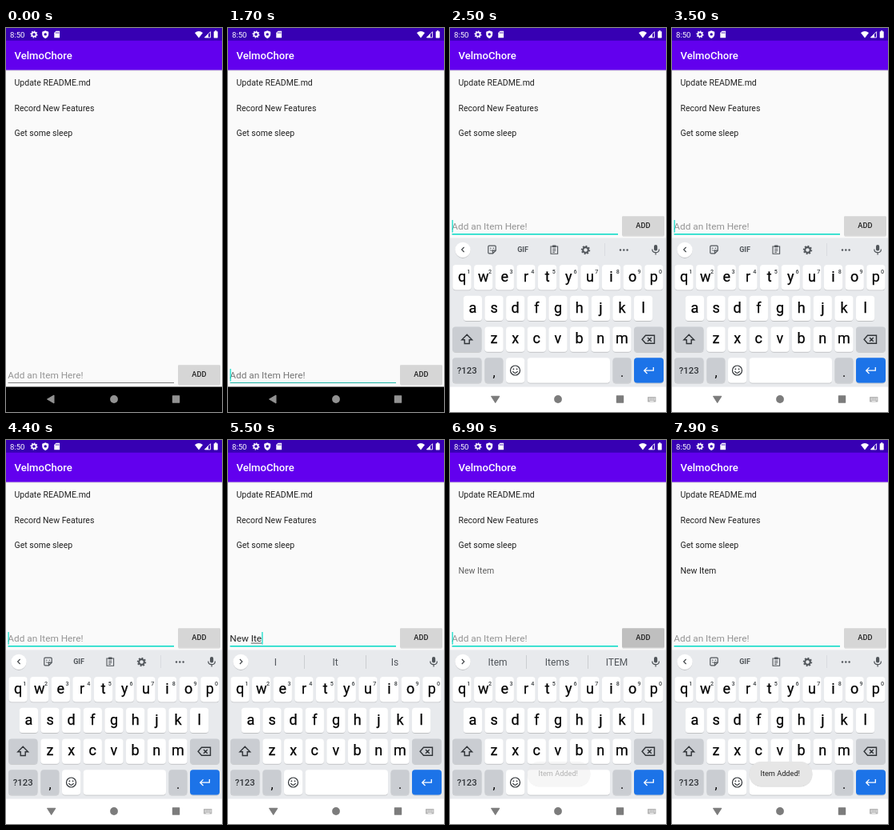
These frames come from a looping animation (270x480 px, 8000 ms). An HTML page:

```html
<!DOCTYPE html>
<html lang="en">
<head>
<meta charset="utf-8">
<style>
  html, body { margin: 0; width: 100%; height: 100%; overflow: hidden; background: #fafafa; }
  svg { display: block; width: 100%; height: 100%; font-family: Roboto, "Noto Sans", sans-serif; }
  text { white-space: pre; }
  .mid { text-anchor: middle; }
  .cap { stroke: #000; stroke-width: .25; }
</style>
</head>
<body>
<svg id="stage" viewBox="0 0 270 480" xmlns="http://www.w3.org/2000/svg"></svg>
<script>
const LOOP = 8000;
const FOCUS = 1700, KEYBOARD = 1950, PRESS = 6750, ADDED = 6880;
const LIFT = 186;
const TYPED = 'New Item';
const KEY_TIMES = [4620, 4760, 4890, 5030, 5220, 5350, 5460, 5620];
const SUGGESTIONS = [
  [4800, ['N', 'No', 'Not']],
  [5000, ['New', 'News', 'Newer']],
  [5200, ['one', 'year', 'day']],
  [5440, ['I', 'It', 'Is']],
  [5680, ['Ite', 'Item', 'Items']],
  [5850, ['Item', 'Items', 'ITEM']]
];
const SUGGEST_END = 6980;
const BLINK_RESETS = [FOCUS, 2050, ...KEY_TIMES, 6950];

// Markup helpers
const rect = (x, y, w, h, fill, more = '') =>
  `<rect x="${x}" y="${y}" width="${w}" height="${h}" fill="${fill}" ${more}/>`;
const circle = (x, y, r, fill, more = '') =>
  `<circle cx="${x}" cy="${y}" r="${r}" fill="${fill}" ${more}/>`;
const path = (d, fill, more = '') => `<path d="${d}" fill="${fill}" ${more}/>`;
const line = (d, color, width = 1.2, more = '') =>
  path(d, 'none', `stroke="${color}" stroke-width="${width}" ${more}`);
const label = (x, y, size, fill, str, more = '') =>
  `<text x="${x}" y="${y}" font-size="${size}" fill="${fill}" ${more}>${str}</text>`;
const mid = (x, y, size, fill, str, more = '') =>
  label(x, y, size, fill, str, 'text-anchor="middle" ' + more);
const group = (id, body, more = '') => `<g id="${id}" ${more}>${body}</g>`;

const gear = (x, y, r, color) =>
  circle(x, y, r * 0.58, 'none', `stroke="${color}" stroke-width="${r * 0.36}"`) +
  circle(x, y, r * 0.84, 'none',
    `stroke="${color}" stroke-width="${r * 0.3}" pathLength="16" stroke-dasharray="1"`);

function statusBar() {
  return rect(0, 0, 270, 15.75, '#3700b3') +
    label(5, 11.7, 9.6, '#fff', '8:50') +
    gear(35, 8, 4.6, '#fff') +
    path('M49.2 3.2l4 1.6v3c0 2.6-1.7 4.3-4 5.2c-2.3-.9-4-2.600-4-5.200v-3z', '#fff') +
    circle(49.2, 7.9, 1.7, '#3700b3') +
    path('M62.5 3.7h4.6v8.6h-6.8v-6.4z', '#fff') +
    line('M62.6 5v2M64.2 5v2M65.8 5v2', '#3700b3', 0.7) +
    path('M236 6.1q5-4.2 10 0l-5 6.3z', '#fff') +
    line('M255.600 4.700v7.200h-7.200z', '#fff', 0.9) +
    path('M253 7.300v4.800h-4.800z', '#fff') +
    rect(259.700, 4.200, 5, 8.200, '#fff', 'rx=".6"') + rect(261.100, 3.200, 2.200, 1.400, '#fff');
}

function appBar() {
  return rect(0, 0, 270, 52.5, '#6200ee', 'filter="url(#shade)"') +
    label(10.5, 39, 13.1, '#fff', 'VelmoChore', 'font-weight="500"');
}

function list() {
  return ['Update README.md', 'Record New Features', 'Get some sleep', 'New Item']
    .map((s, i) => label(10.5, 72.2 + i * 31.5, 10.52, '#212121', s, `id="item${i}"`)).join('');
}

function entryRow() {
  return group('entry',
    label(2.3, 438.1, 11.8, '#949494', 'Add an Item Here!', 'id="hint"') +
    label(2.3, 438.1, 11.8, '#212121', '', 'id="typed"') +
    rect(0, 439.6, 0, 0.8, '#333', 'id="compose"') +
    rect(2.5, 443, 207.5, 1, '#808080', 'id="under"') +
    rect(2.3, 426, 1.2, 15.6, '#03dac5', 'id="cursor"') +
    rect(215, 421.2, 53, 24.3, '#d6d7d7', 'id="button" rx="1.4" filter="url(#soft)"') +
    mid(241.4, 436.4, 9.2, '#212121', 'ADD', 'font-weight="500"'));
}

function tools() {
  const c = '#50555a';
  return line('M17.600 274l-3 3l3 3', '#3c4043', 1.1) +
    line('M49 272.200h7q1.200 0 1.200 1.200v4.800l-3.700 3.700h-4.500q-1.200 0-1.200-1.200v-7.300q0-1.200 1.200-1.200zM57 278.200h-3.500v3.500', c) +
    circle(50.8, 275.3, 0.7, c) + circle(54.3, 275.3, 0.7, c) +
    line('M50 277.5q2 2 3.5 0', c, 0.9) +
    mid(91, 280.3, 9, c, 'GIF', 'font-weight="700"') +
    line('M126 273h8.6v9.3h-8.6zM128.3 276.2h4M128.3 278.2h4M128.3 280.2h2.6', c, 1.1) +
    rect(128, 271.4, 4.6, 2.8, c, 'rx=".6"') +
    gear(169.5, 277.5, 5.8, c) +
    rect(193, 269, 0.8, 16, '#d6d9dc') +
    [213, 217.3, 221.6].map(x => circle(x, 277.5, 1.2, c)).join('');
}

function suggestionBar() {
  return line('M14.800 274l3 3l-3 3', '#3c4043', 1.1) +
    [59.5, 134, 208.5].map((x, i) => mid(x, 281.7, 12, '#50555a', '', `id="word${i}"`)).join('') +
    [95, 172].map(x => rect(x, 269, 0.8, 17, '#c4c7ca')).join('');
}

const key = (x, y, w, fill) => rect(x, y, w, 31.3, fill, 'rx="4" filter="url(#edge)"');

function letters(row, first, y, numbered) {
  return [...row].map((ch, i) => {
    const x = first + i * 26.65;
    return key(x - 11.6, y, 23.2, '#fff') + mid(x, y + 20.8, 18, '#000', ch, 'class="cap"') +
      (numbered ? mid(x + 8.3, y + 10.8, 7.2, '#3c4043', (i + 1) % 10, 'font-weight="500"') : '');
  }).join('');
}

function keyboard() {
  const grey = '#cacdd2', ink = '#303438';
  return group('keyboard',
    rect(0, 262.5, 270, 186, '#e8eaed') +
    circle(16, 277.3, 9.6, '#fff', 'filter="url(#edge)"') +
    group('tools', tools()) + group('suggest', suggestionBar()) +
    rect(255, 271, 4.2, 7.6, '#50555a', 'rx="2.1"') +
    line('M252.8 276.5q0 4.2 4.3 4.2t4.3-4.2M257.1 280.7v2.8', '#50555a', 1.2) +
    letters('qwertyuiop', 15, 296, true) +
    letters('asdfghjkl', 28.4, 334.7) +
    key(3, 373.5, 36.5, grey) + letters('zxcvbnm', 55, 373.5) + key(230, 373.5, 37, grey) +
    line('M21.2 383.200l-6.400 6.500h3.400v4.800h6v-4.800h3.400z', ink, 1.4) +
    line('M244.5 384.300h11v10h-11l-4.400-5zM247 386.900l4.800 4.800M251.800 386.900l-4.800 4.800', ink, 1.4) +
    key(3, 412.2, 36.5, grey) + mid(21.2, 432, 11.3, ink, '?123', 'font-weight="500"') +
    key(43.4, 412.2, 23, grey) + mid(55, 436, 16, '#000', ',') +
    key(70, 412.2, 23.2, '#fff') +
    circle(81.5, 428, 6, 'none', `stroke="${ink}" stroke-width="1.2"`) +
    circle(79.4, 426.3, 0.9, ink) + circle(83.6, 426.3, 0.9, ink) +
    line('M78.4 429.2q3.1 4.200 6.200 0', ink, 1.2) +
    key(96.7, 412.2, 103.3, '#fff') +
    key(203.5, 412.2, 23, grey) + mid(215, 436, 16, '#000', '.') +
    key(230, 412.2, 37, '#1a73e8') +
    line('M254.300 424v4.200h-11.600M246.500 424.400l-3.800 3.800l3.800 3.800', '#fff', 1.3));
}

function navIcons() {
  const c = '#b4b4b4';
  const dots = [0, 1, 2, 3].map(i => rect(248.6 + i * 2.2, 462.4, 1.1, 1.1, '#fff') +
    rect(248.6 + i * 2.2, 464.3, 1.1, 1.1, '#fff')).join('');
  return group('nav',
    '<path id="back" stroke-width="1" stroke-linejoin="round"/>' +
    '<circle cx="135" cy="464" r="4.9"/>' +
    '<rect x="207.8" y="459.300" width="9.4" height="9.4" rx=".6"/>') +
    group('imeIcon', rect(247, 461, 10.4, 6.4, c, 'rx=".6"') + dots +
      rect(249.8, 466, 4.8, 0.7, '#fff'));
}

function toast() {
  return group('toast',
    rect(96.5, 402, 79, 30.5, '#e6e6e6', 'rx="15.2" filter="url(#soft)"') +
    mid(135.2, 420.2, 9.2, '#212121', 'Item Added!'));
}

const shadow = (id, dy, blur, alpha) =>
  `<filter id="${id}" x="-10%" y="-15%" width="120%" height="140%">
    <feDropShadow dx="0" dy="${dy}" stdDeviation="${blur}" flood-opacity="${alpha}"/></filter>`;

const stage = document.getElementById('stage');
stage.innerHTML =
  `<defs>${shadow('shade', 0.8, 0.6, 0.2)}${shadow('soft', 0.7, 0.5, 0.25)}${shadow('edge', 0.8, 0.25, 0.22)}</defs>` +
  rect(0, 0, 270, 480, '#fafafa') + appBar() + statusBar() + list() + entryRow() +
  rect(0, 448.5, 270, 31.5, '#000', 'id="navBack"') + keyboard() + navIcons() + toast();

const el = {};
stage.querySelectorAll('[id]').forEach(n => el[n.id] = n);
const set = (id, attrs) => {
  for (const k in attrs) el[id].setAttribute(k, attrs[k]);
};
const show = (id, on) => set(id, { visibility: on ? 'visible' : 'hidden' });
const ramp = (t, start, length) => Math.min(1, Math.max(0, (t - start) / length));

const pen = document.createElement('canvas').getContext('2d');
const widthOf = s => {
  pen.font = '11.8px Roboto, "Noto Sans", sans-serif';
  return pen.measureText(s).width;
};

function drawEntry(t, up) {
  const focused = t >= FOCUS;
  const count = t < ADDED ? KEY_TIMES.filter(k => t >= k).length : 0;
  const text = TYPED.slice(0, count);
  const wordStart = text.lastIndexOf(' ') + 1;
  const before = widthOf(text.slice(0, wordStart)), end = widthOf(text);
  const reset = BLINK_RESETS.filter(b => t >= b).pop();

  set('entry', { transform: `translate(0 ${up ? -LIFT : 0})` });
  show('hint', !count);
  set('hint', { fill: focused && !up ? '#757575' : '#949494' });
  el.typed.textContent = text;
  set('compose', { x: 2.3 + before, width: end - before });
  set('under', {
    fill: !focused ? '#808080' : up ? '#03dac5' : '#1fb5a6',
    height: up ? 1.5 : 1
  });
  set('cursor', { x: 2.3 + end + 0.2 });
  show('cursor', focused && (t - reset) % 1000 < 500);

  const held = ramp(t, PRESS, 100) * (1 - ramp(t, 6930, 200));
  const tone = Math.round(214 - 23 * held);
  set('button', { fill: `rgb(${tone},${tone},${tone})` });
}

function drawKeyboard(t, up) {
  const p = ramp(t, KEYBOARD, 250);
  show('keyboard', up);
  set('keyboard', {
    transform: `translate(0 ${24 * (1 - p) ** 2})`,
    opacity: Math.min(1, p * 2.5)
  });
  const now = SUGGESTIONS.filter(s => t >= s[0]).pop();
  const suggesting = up && now && t < SUGGEST_END;
  show('tools', up && !suggesting);
  show('suggest', suggesting);
  if (suggesting) now[1].forEach((word, i) => el['word' + i].textContent = word);

  const navColor = up ? '#7c7c7c' : '#929292';
  set('navBack', { fill: up ? '#fff' : '#000' });
  set('nav', { fill: navColor });
  set('back', {
    d: up ? 'M51.5 460.3h10.4l-5.2 8.2z' : 'M51.5 464l8.500-5v10z',
    stroke: navColor
  });
  show('imeIcon', up);
}

function draw(t) {
  const up = t >= KEYBOARD;
  drawEntry(t, up);
  drawKeyboard(t, up);
  set('item3', { opacity: ramp(t, 6820, 115) });
  set('toast', { opacity: ramp(t, 6850, 150) });
}

const begin = performance.now();
function tick() {
  draw((performance.now() - begin) % LOOP);
  requestAnimationFrame(tick);
}
tick();
</script>
</body>
</html>
```
